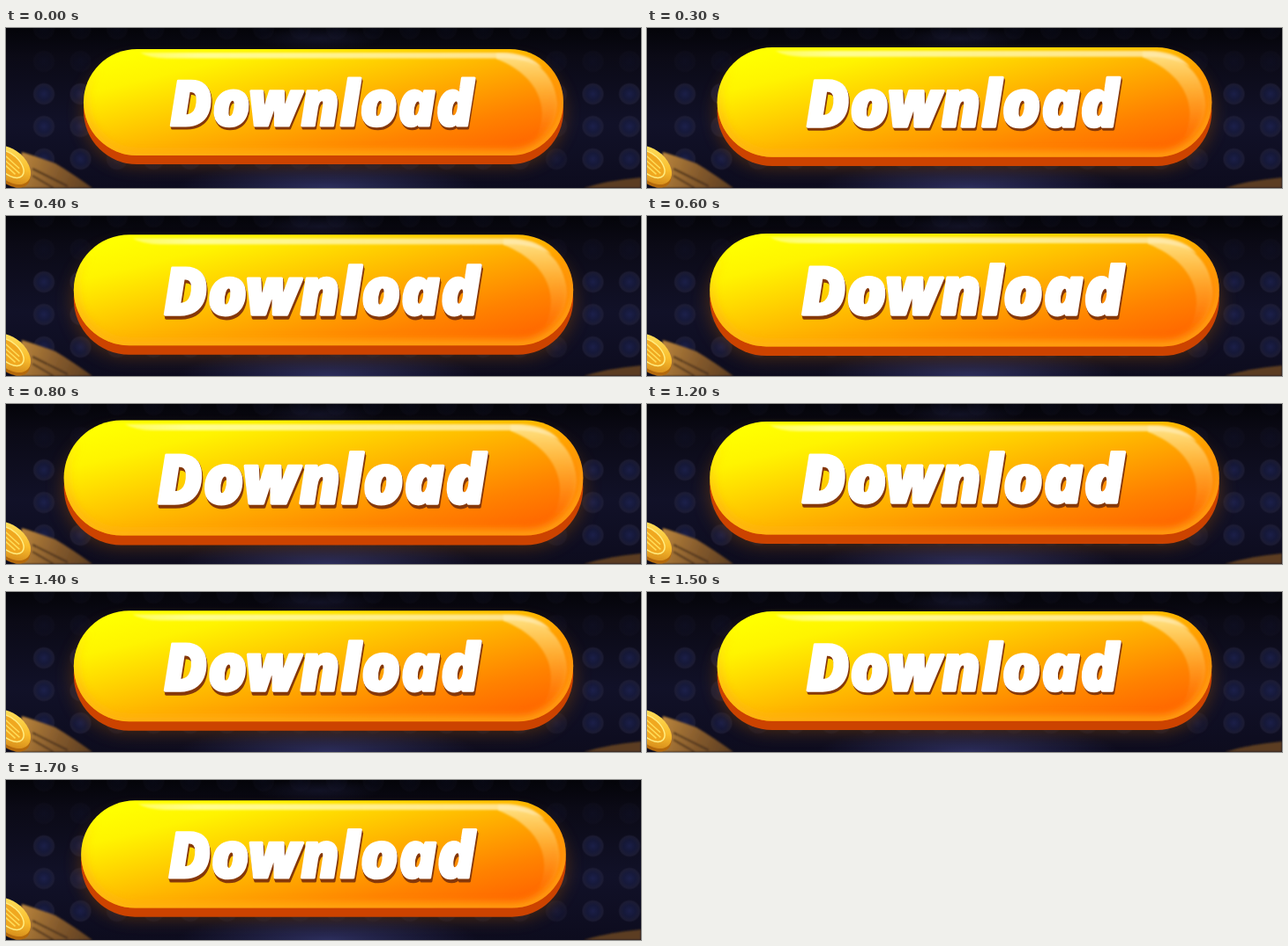
Write an HTML page that moves like this. It is 720x182 px and loops after 1800 ms.

```html
<!DOCTYPE html>
<html lang="en">
<head>
<meta charset="utf-8">
<title>Download button</title>
<style>
html, body { margin: 0; width: 100%; height: 100%; overflow: hidden; background: #090913; }
svg { display: block; width: 720px; height: 182px; }
text { font: italic 800 71px "Open Sans", "Noto Sans", sans-serif; text-anchor: middle; stroke-width: 3.2; stroke-linejoin: round; }
</style>
</head>
<body>
<svg viewBox="0 0 720 182">
  <defs>
    <linearGradient id="night" x2="0" y2="1">
      <stop offset="0" stop-color="#040409"/>
      <stop offset=".18" stop-color="#0b0a16"/>
      <stop offset=".6" stop-color="#111128"/>
      <stop offset="1" stop-color="#0d0c1e"/>
    </linearGradient>
    <radialGradient id="haze">
      <stop offset="0" stop-color="#2c2e5c"/>
      <stop offset="1" stop-color="#2c2e5c" stop-opacity="0"/>
    </radialGradient>
    <radialGradient id="dot">
      <stop offset="0" stop-color="#232a62"/>
      <stop offset=".5" stop-color="#1a1f48"/>
      <stop offset=".85" stop-color="#24243f"/>
      <stop offset="1" stop-color="#24243f" stop-opacity="0"/>
    </radialGradient>
    <linearGradient id="face" gradientUnits="userSpaceOnUse" x1="348" y1="-20" x2="397" y2="181">
      <stop offset="0" stop-color="#ffff00"/>
      <stop offset=".15" stop-color="#fff400"/>
      <stop offset=".5" stop-color="#ffb600"/>
      <stop offset=".8" stop-color="#ff8200"/>
      <stop offset="1" stop-color="#ff6600"/>
    </linearGradient>
    <linearGradient id="rim" gradientUnits="userSpaceOnUse" x1="0" y1="45" x2="0" y2="110">
      <stop offset="0" stop-color="#ffc420" stop-opacity="0"/>
      <stop offset="1" stop-color="#ffb418"/>
    </linearGradient>
    <linearGradient id="shine" gradientUnits="userSpaceOnUse" x1="150" y1="0" x2="600" y2="0">
      <stop offset="0" stop-color="#ffffb0" stop-opacity=".5"/>
      <stop offset=".15" stop-color="#ffffa8" stop-opacity=".85"/>
      <stop offset="1" stop-color="#ffeab0" stop-opacity=".8"/>
    </linearGradient>
    <linearGradient id="gleam" gradientUnits="userSpaceOnUse" x1="606" y1="36" x2="604" y2="128">
      <stop offset="0" stop-color="#ffe698" stop-opacity=".8"/>
      <stop offset=".4" stop-color="#ffc860" stop-opacity=".5"/>
      <stop offset="1" stop-color="#ffa030" stop-opacity="0"/>
    </linearGradient>
    <linearGradient id="coin" x2="1" y2="1">
      <stop offset="0" stop-color="#ffe868"/>
      <stop offset=".55" stop-color="#f9bc2c"/>
      <stop offset="1" stop-color="#c87a14"/>
    </linearGradient>
    <linearGradient id="trail" gradientUnits="userSpaceOnUse" x1="20" y1="150" x2="98" y2="184">
      <stop offset="0" stop-color="#b5813a"/>
      <stop offset=".5" stop-color="#83592c"/>
      <stop offset="1" stop-color="#5a3c20"/>
    </linearGradient>
    <filter id="soft" x="-20%" y="-60%" width="140%" height="220%"><feGaussianBlur stdDeviation="9"/></filter>
    <filter id="blur" x="-20%" y="-40%" width="140%" height="180%"><feGaussianBlur stdDeviation="4"/></filter>
    <filter id="fine" x="-10%" y="-40%" width="120%" height="180%"><feGaussianBlur stdDeviation=".8"/></filter>
    <clipPath id="pill"><rect x="88" y="24" width="544" height="121" rx="60.5"/></clipPath>
  </defs>

  <rect width="720" height="182" fill="url(#night)"/>
  <ellipse cx="365" cy="182" rx="170" ry="32" fill="url(#haze)"/>
  <ellipse cx="355" cy="12" rx="70" ry="14" fill="url(#haze)" opacity=".3"/>
  <g id="dots"></g>
  <g filter="url(#fine)">
    <path d="M18 141Q34 146 56 154Q76 166 98 182H10Z" fill="url(#trail)"/>
    <path d="M30 160L70 180M30 168L54 182" stroke="#4a301c" stroke-width="2"/>
    <path d="M655 182Q684 173 720 170V182Z" fill="#5b3d20"/>
  </g>
  <g transform="translate(5 156) rotate(42)">
    <ellipse cx="2" cy="3" rx="27" ry="17" fill="#b4690c"/>
    <ellipse rx="27" ry="17" fill="url(#coin)"/>
    <ellipse cx="-2" rx="20" ry="11" fill="#f0a820" stroke="#ffec80" stroke-width="1.5"/>
    <path d="M-14 -4H10M-14 0H14M-12 4H11" stroke="#ffdc58" stroke-width="1.5"/>
  </g>

  <g id="button">
    <rect x="86" y="36" width="548" height="122" rx="61" fill="#8a4800" opacity=".45" filter="url(#soft)"/>
    <rect x="88" y="34" width="544" height="121" rx="60.5" fill="#cc4300"/>
    <rect x="88" y="24" width="544" height="121" rx="60.5" fill="url(#face)"/>
    <g clip-path="url(#pill)">
      <rect x="88" y="24" width="544" height="121" rx="60.5" fill="none" stroke="url(#rim)" stroke-width="13" opacity=".7" filter="url(#blur)"/>
      <path d="M556 29C598 29 623 52 625 86C625 108 612 126 594 134C618 106 614 58 556 35Z" fill="url(#gleam)" filter="url(#fine)"/>
      <path d="M152 28H568Q596 30 608 46Q592 35 566 34.5H182Q162 34 152 28Z" fill="url(#shine)" filter="url(#fine)"/>
    </g>
    <g id="label" transform="translate(0 86) skewX(3) translate(0 -86)"></g>
  </g>
</svg>
<script>
const LOOP = 1800, STEP = 100, GROW = 0.0925;
const $ = id => document.getElementById(id);

let dots = "";
for (let row = 0; row < 5; row++)
  for (let col = 0; col < 17; col++) {
    const x = 43 + col * 41.5, y = 1 + row * 37;
    const side = x < 110 || x > 640;
    const glow = row < 2 ? 0.12 : side ? 0.6 : 0.35;
    dots += `<circle cx="${x}" cy="${y}" r="13" fill="url(#dot)" opacity="${glow}"/>`;
  }
$("dots").innerHTML = dots;

const word = (x, y, color) => `<text x="${x}" y="${y}" fill="${color}" stroke="${color}">Download</text>`;
$("label").innerHTML = word(358.5, 114.5, "#85380a") + word(358, 112.5, "#85380a") + word(357.5, 111, "#fff");

function draw(ms) {
  const t = Math.floor((ms % LOOP) / STEP) * STEP;
  const half = LOOP / 2;
  const s = 1 + GROW * (1 - Math.abs(t - half) / half);
  $("button").setAttribute("transform", `translate(360 89.5) scale(${s}) translate(-360 -89.5)`);
}

const start = performance.now();
function tick() {
  draw(performance.now() - start);
  requestAnimationFrame(tick);
}
draw(0);
tick();
</script>
</body>
</html>
```
